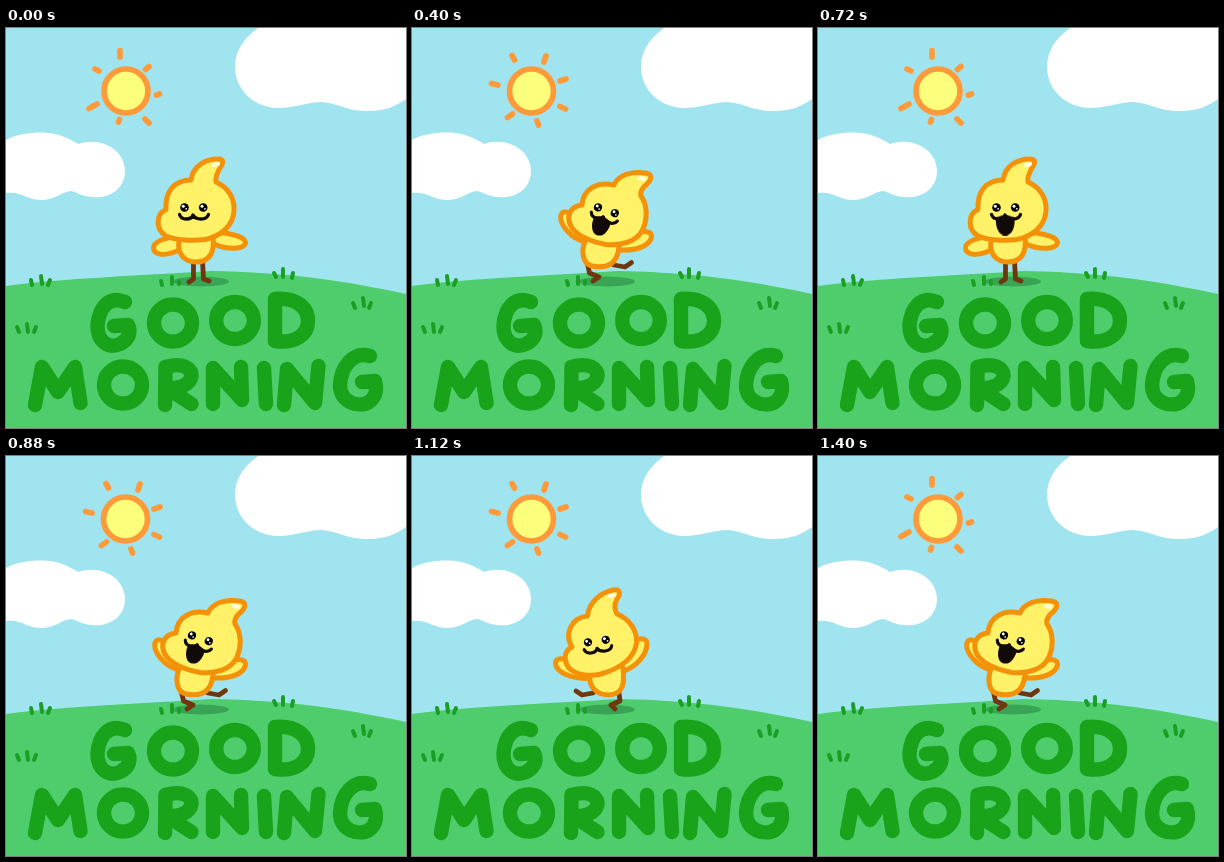
Write an HTML page that moves like this. It is 400x400 px and loops after 1440 ms.

```html
<!DOCTYPE html>
<html lang="en">
<head>
<meta charset="utf-8">
<title>Good morning</title>
<style>
  html, body { margin: 0; width: 100%; height: 100%; overflow: hidden; background: #a0e4f0; }
  svg { display: block; width: 100%; height: 100%; }
  .line { fill: none; stroke-linecap: round; stroke-linejoin: round; }
  .letters { stroke: #18a31b; stroke-width: 14.4; }
  .tufts { stroke: #1a9f24; stroke-width: 4; }
  .sun { fill: none; stroke: #ff9a3a; stroke-width: 5.7; stroke-linecap: round; }
  .sun circle { fill: #fbff7c; }
  .skin { fill: #fff268; stroke: #f39208; stroke-width: 5; stroke-linecap: round; stroke-linejoin: round; }
  .legs { stroke: #70370f; stroke-width: 4.8; }
  .shine { stroke: #fffce0; stroke-width: 4; }

  /* The sun swaps every 120 ms, the bird every 80 ms. */
  .sun-a { animation: sun-a 240ms step-end infinite; }
  .sun-b { animation: sun-b 240ms step-end infinite; }
  .stand { animation: stand 480ms step-end infinite; }
  .gape  { animation: gape 480ms step-end infinite; }
  .left  { animation: left 480ms step-end infinite; transform-origin: 192px 250px; }
  .right { animation: right 480ms step-end infinite; transform-origin: 192px 250px; }

  @keyframes sun-a {
    0% { visibility: visible; }
    33.3% { visibility: hidden; }
    83.3%, 100% { visibility: visible; }
  }
  @keyframes sun-b {
    0% { visibility: hidden; }
    33.3% { visibility: visible; }
    83.3%, 100% { visibility: hidden; }
  }
  @keyframes stand {
    0% { visibility: visible; }
    16.6% { visibility: hidden; }
    50% { visibility: visible; }
    66.6%, 100% { visibility: hidden; }
  }
  @keyframes gape {
    0% { opacity: 0; }
    50%, 100% { opacity: 1; }
  }
  @keyframes left {
    0% { visibility: hidden; transform: none; }
    16.6% { visibility: visible; transform: rotate(-3deg); }
    33.3% { visibility: visible; transform: none; }
    50%, 100% { visibility: hidden; transform: none; }
  }
  @keyframes right {
    0% { visibility: hidden; transform: none; }
    66.6% { visibility: visible; transform: rotate(3deg); }
    83.3%, 100% { visibility: visible; transform: none; }
  }
</style>
</head>
<body>
<svg viewBox="0 0 400 400" role="img" aria-label="Good morning">
  <defs>
    <g id="face">
      <circle cx="-9.5" cy="0" r="4.3"/>
      <circle cx="9.2" cy="0" r="4.3"/>
      <g fill="#fff">
        <circle cx="-10.7" cy="-1.2" r="1.5"/>
        <circle cx="8" cy="-1.2" r="1.5"/>
        <circle cx="-7.8" cy="1.3" r=".9"/>
        <circle cx="10.9" cy="1.3" r=".9"/>
      </g>
      <path class="line" stroke="#120a08" stroke-width="3.3"
        d="M-14.500 7Q-13 11.500 -8 11.500Q-2 11.500 -1 7.500Q1 11.500 7 11.500Q13 11.500 14.500 7"/>
    </g>
    <path id="maw" fill="#120a08" d="M-10 10C-11 20 -7 28 -1 28C6 28 9.500 20 8.500 10L-1 7Z"/>
  </defs>

  <rect width="400" height="400" fill="#a0e4f0"/>
  <g fill="#fff">
    <path d="M252 0C236 12 229 24 229 40C230 62 247 79 272 80C290 80 300 74 316 74C335 76 340 83 362 83C380 83 390 78 400 71V0Z"/>
    <path d="M0 112C10 106 26 104 38 104.500C52 105 62 110 72 116C95 108 119 122 119 143C119 163 100 171 86 169C74 168 70 163 64 163C54 165 50 171 36 172C20 172 16 163 0 165Z"/>
  </g>

  <g class="sun sun-a">
    <circle cx="120" cy="63" r="22"/>
    <path d="M114 22.500V29M89 41L93 43M139.500 41.500L143 38.500M150.500 67L153.500 66M139 91L143 95M113.500 91.500L112.500 94M83 80.500L91 76"/>
  </g>
  <g class="sun sun-b">
    <circle cx="119.500" cy="63" r="22"/>
    <path d="M100 27.500L102.500 32M134 28L132 34M79.500 55.500L86 57M148 53L154 51M148 78.500L153.500 81M125 93L126.500 97M95.500 89.500L100.500 86"/>
  </g>

  <path fill="#4fcd6c" d="M0 258C60 250 130 248 205 243C280 244 340 253 400 266V400H0Z"/>
  <ellipse cx="195" cy="253.500" rx="28" ry="5" fill="#39a356"/>
  <path class="line tufts" d="M25 252L26 257M35 248L36 256M44 252L42 257
    M155 253L156 257M166 249V256M173 253V256
    M268 245L270 249M277 241V249M287 245L286 250
    M347 275L349 280M357 270L358 278M365 275L363 280
    M11 299L13 304M21 296L22 304M30 299L28 304"/>

  <g class="line letters">
    <path d="M119 274C102 267 93 281 91.500 297C91 314 103 321 114 316C124 311 125 303 122 297L108 298"/>
    <ellipse cx="167" cy="295" rx="19" ry="18.500"/>
    <ellipse cx="229" cy="292.500" rx="18.800" ry="18.500"/>
    <path d="M269 271V313C290 316 302 306 302 293C302 278 288 269 269 271"/>
    <path d="M29 377L36 339L52 364L69 339L74.500 375"/>
    <ellipse cx="117" cy="357" rx="19" ry="18.500"/>
    <path d="M159 377L159.500 339C176 334 186 340 185.500 348C184 357 173 361 161 360L185.500 376"/>
    <path d="M207 376V340L236 372L235 339"/>
    <path d="M258 340L260 376"/>
    <path d="M278 377L281 341L309 375L312.500 338"/>
    <path d="M364 328C346 323 335 340 334 357C334 375 353 380 363 374C371 368 371 361 369 353L356 354"/>
  </g>

  <g class="stand">
    <path class="line legs" d="M187.500 233V251L183 254M196.500 233L197.500 251L203 253"/>
    <g class="skin">
      <path d="M175 209C163 208 147 213 147.500 220C148 229 164 228 176 220"/>
      <path d="M206 206C213 203 238 207 239.500 214C240 222 221 222 208 216"/>
      <path d="M173.500 211C170 225 178 234 190 234C203 234 209 225 207 209"/>
      <path d="M185 152C187 138 199 131 212 131C218 131 217.500 135 214.500 139C211 145 209 150 210 154C221 159 229 169 228 183C227 198 215 208 199 211.500C187 213 170 212.500 160 208C149 201 150 186 160 181.500C159 165 167 152 185 152Z"/>
    </g>
    <path class="line shine" d="M208 137L212 136"/>
    <use href="#face" transform="translate(188 179.500)"/>
    <use class="gape" href="#maw" transform="translate(188 179.500)"/>
  </g>

  <g class="left">
    <path class="line legs" d="M181 237L170 239L164 235M207 237L208 245L199 249L203 253"/>
    <g class="skin">
      <path d="M158 206C148 200 142 203 144 210C148 219 166 224 180 222"/>
      <path d="M220 188C228 180 236 182 235 189C234 199 225 210 212 215"/>
      <path d="M178 218C176 232 186 239 197 239C211 238 213 228 211 212"/>
      <path d="M175.500 160C177 146 189 136 201.500 134C209 133 208.500 139 205 143C202 149 202 153 205 158C217 163 225.500 174 224.500 187C222 204 206 213 189 218C177 221 164 219 157 212C151 204 152 195 160 191C152 178 159 162 175.500 160Z"/>
    </g>
    <path class="line shine" d="M198 140L202 139"/>
    <use href="#face" transform="translate(185 185) rotate(-8) scale(.96)"/>
  </g>

  <g class="right">
    <path class="line legs" d="M175.500 236L177.500 245L187 249L181 253M202 237L213 239L219.500 234.500"/>
    <g class="skin">
      <path d="M174 214C158 211 147 195 149 187C151 181 158 184 161 191"/>
      <path d="M221 206C232 202 240 203 239.500 209C238 217 226 223 208 222"/>
      <path d="M173.500 212C169 222 170 236 180 238C195 241 206 236 207 218"/>
      <path d="M202 157C206 147 219 143 233 145C241 146 240 151 235 156C230 160 228 164 229 168C235 176 236 190 231 201C225 214 209 218 194 216.500C181 214 167 209 160 200C153 189 158 178 170 177C171 162 184 153 202 157Z"/>
    </g>
    <path class="line shine" d="M228 150L232 151"/>
    <g transform="translate(194.500 182.300) rotate(19) scale(.95)">
      <use href="#face"/>
      <use href="#maw"/>
    </g>
  </g>
</svg>
</body>
</html>
```
